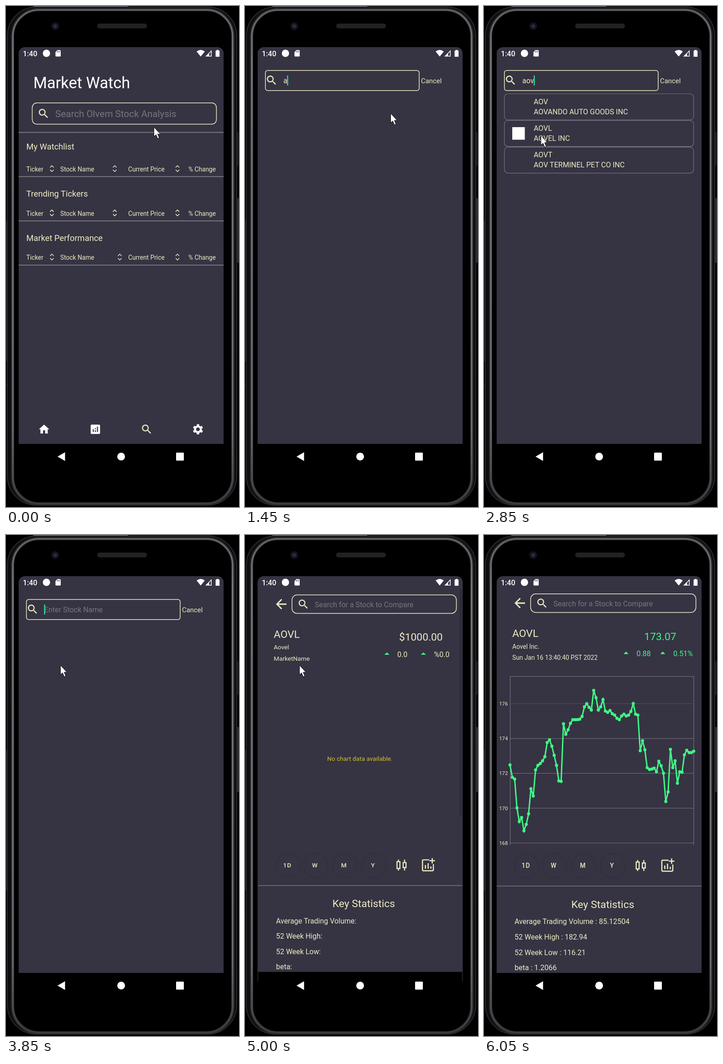
An HTML page that plays this animation: 511 by 1096 pixels, repeating every 6450 ms.

```html
<!DOCTYPE html>
<html lang="en">
<head>
<meta charset="utf-8">
<title>Market Watch</title>
<style>
html, body { margin: 0; width: 100%; height: 100%; overflow: hidden; background: #000; }
svg { display: block; width: 100%; height: 100%; font-family: Roboto, sans-serif; }
text { white-space: pre; }
</style>
</head>
<body>
<svg id="stage" viewBox="0 0 511 1096"></svg>
<script>
const LOOP = 6450, SP = 1.146;
const BG = '#363343', CREAM = '#eeecc2', GREY = '#78767f', GREEN = '#3ffa86';
const CX = 252.5, CY = 552;

// ---- drawing helpers (all return markup) ----
const text = (x, y, sp, str, fill = CREAM, more = '') =>
  `<text x="${x}" y="${y}" font-size="${sp * SP}" fill="${fill}" ${more}>${str}</text>`;
const rect = (x, y, w, h, fill, more = '') =>
  `<rect x="${x}" y="${y}" width="${w}" height="${h}" fill="${fill}" ${more}/>`;
const box = (x, y, w, h, r, stroke, width = 1.5) =>
  rect(x, y, w, h, 'none', `rx="${r}" stroke="${stroke}" stroke-width="${width}"`);
const path = (d, fill, more = '') => `<path d="${d}" fill="${fill}" ${more}/>`;
const line = (d, stroke, width) => path(d, 'none', `stroke="${stroke}" stroke-width="${width}"`);
const circle = (x, y, r, fill, more = '') => `<circle cx="${x}" cy="${y}" r="${r}" fill="${fill}" ${more}/>`;
const icon = (d, x, y, fill = CREAM, s = SP) =>
  path(d, fill, `fill-rule="evenodd" transform="translate(${x} ${y}) scale(${s}) translate(-12 -12)"`);
const group = (id, body) => `<g id="${id}">${body}</g>`;

const LENS = 'M15.5 14h-.8l-.3-.3A6.5 6.5 0 1 0 13.7 14.4l.3.3v.8l5 5 1.5-1.5zM9.5 14a4.5 4.5 0 1 1 0-9 4.5 4.5 0 0 1 0 9z';
const HOME = 'M10 20v-6h4v6h5v-8h3L12 3 2 12h3v8z';
const STATS = 'M5 3h14a2 2 0 0 1 2 2v14a2 2 0 0 1-2 2H5a2 2 0 0 1-2-2V5a2 2 0 0 1 2-2zM7 12h2v5H7zM11 14h2v3h-2zM11 10h2v2h-2zM15 7h2v10h-2z';
const BACK = 'M20 11H7.83l5.59-5.59L12 4l-8 8 8 8 1.41-1.41L7.83 13H20z';

const gear = (x, y) => `<g transform="translate(${x} ${y}) scale(${SP})" fill="none" stroke="#fff">
  <circle r="5.5" stroke-width="4"/>
  <circle r="8.3" stroke-width="3" pathLength="6" stroke-dasharray=".52 .48" stroke-dashoffset="-.24" /></g>`;
const sorter = (x, y) => line(`M${x - 4} ${y - 2.5}l4-4 4 4M${x - 4} ${y + 2.5}l4 4 4-4`, CREAM, 1.5);
const rise = (x, y) => path(`M${x - 5.5} ${y + 2.5}l5.5-5.5 5.5 5.5z`, GREEN);

const screenWindow = (id, body) => group(id,
  rect(27.5, 90, 450, 868, BG) + body + rect(27.5, 958, 450, 57, '#000'));

// ---- screens ----
function market() {
  const table = (title, titleY, y, nameSort) =>
    text(44.5, titleY, 16, title) +
    [['Ticker', 44.5], ['Stock Name', 119], ['Current Price', 268], ['% Change', 400]]
      .map(([s, x]) => text(x, y, 12, s)).join('') +
    [100.5, nameSort, 376].map(x => sorter(x, y - 6)).join('') +
    rect(27.5, y + 10.5, 450, 2, GREY);
  return text(60, 179.5, 30, 'Market Watch', '#fff') +
    box(57.5, 212, 404, 46.5, 10, CREAM) + icon(LENS, 82.3, 235.3) +
    text(108, 243, 18, 'Search Olvem Stock Analysis', GREY) +
    rect(27.5, 275.5, 450, 2, GREY) +
    table('My Watchlist', 313.5, 361.7, 238.5) +
    table('Trending Tickers', 416.5, 458.6, 238.5) +
    table('Market Performance', 513.5, 555.3, 249.5) +
    icon(HOME, 83.5, 926, '#fff') + icon(STATS, 196, 926, '#fff') +
    icon(LENS, 308.5, 926) + gear(421, 926);
}

function search() {
  const rows = [
    ['AOV', 'AOVANDO AUTO GOODS INC'],
    ['AOVL', 'AOVEL INC'],
    ['AOVT', 'AOV TERMINEL PET CO INC']
  ];
  const row = ([ticker, name], i) => {
    const y = 192 + i * 58.3;
    return box(44.7, y, 415, 57, 8, GREY, 1.2) +
      text(109, y + 22.8, 14, ticker) + text(109, y + 44.8, 14, name);
  };
  return box(44.7, 141, 337.3, 44, 5, CREAM) + icon(LENS, 58.3, 162.5) +
    text(386, 168.7, 13, 'Cancel') +
    text(84, 169, 14, 'Enter Stock Name', GREY, 'id="hint"') +
    text(84, 169, 14, '', CREAM, 'id="typed"') +
    rect(0, 152, 2.4, 22, '#2fd890', 'id="caret"') +
    group('results', rows.map(row).join('') + rect(62, 265, 27.5, 27.5, '#fff'));
}

// pixel heights of the price curve, evenly spaced in x
const CURVE = [503, 530, 534, 597, 627, 618, 647, 633, 610, 555, 571, 514, 504, 500, 494, 485, 454, 448, 462, 482,
  504, 538, 539, 413, 436, 426, 412, 404, 404, 404, 403, 397, 376, 369, 377, 383, 340, 356, 383, 376,
  360, 385, 388, 384, 391, 394, 401, 404, 396, 392, 396, 394, 386, 369, 392, 394, 472, 450, 470, 509,
  513, 512, 510, 518, 495, 505, 521, 583, 562, 469, 509, 494, 543, 518, 519, 481, 471, 476, 476, 473];

function chart() {
  const pts = CURVE.map((y, i) => [57 + i * 5.1, y]);
  let out = line('M57.5 678V309.5H460V678', GREY, 1.2);
  for (let i = 0; i < 5; i++) {
    const y = 369 + i * 76.2;
    out += line(`M57 ${y}H460`, i == 0 ? '#55535f' : GREY, 1) +
      text(52.5, y + 4, 10, 176 - 2 * i, CREAM, 'text-anchor="end"');
  }
  return out + line('M' + pts.join('L'), GREEN, 3) +
    pts.map(([x, y]) => circle(x, y, 3.4, GREEN)).join('');
}

function detail() {
  const mid = 'text-anchor="middle"';
  const labels = ['Average Trading Volume', '52 Week High', '52 Week Low', 'beta'];
  const stats = tails => labels.map((s, i) => text(67, 851.3 + i * 33.7, 14, s + tails[i])).join('');
  const buttons = [['1D', 92], ['W', 153], ['M', 217], ['Y', 281]].map(([s, x]) =>
    circle(x + 1.5, 724, 27, 'none', 'stroke="#312e3d" stroke-width="1.5"') +
    text(x, 728, 12, s, CREAM, mid + ' font-weight="500" letter-spacing="1"')).join('');
  return icon(BACK, 78.5, 149, CREAM, 1.44) +
    box(102.3, 128.7, 362.4, 40.8, 11, CREAM) + icon(LENS, 127.3, 149.3) +
    text(152.5, 155.7, 14, 'Search for a Stock to Compare', GREY) +
    text(62, 222.7, 20, 'AOVL') + rise(311.5, 258) + rise(392, 258) +
    group('blank',
      text(62, 248.8, 12, 'Aovel') + text(62, 273, 12, 'MarketName') +
      text(386.5, 229.7, 20, '$1000.00', CREAM, mid) +
      text(334.5, 265, 14, '0.0') + text(415.5, 265, 14, '%0.0') + stats([':', ':', ':', ':'])) +
    group('quote',
      text(62, 248.8, 12, 'Aovel Inc.') + text(62, 273, 12, 'Sun Jan 16 13:40:40 PST 2022') +
      text(386.5, 229.7, 20, '173.07', GREEN, mid) +
      text(334.5, 265, 14, '0.88', GREEN) + text(415, 265, 14, '0.51%', GREEN) +
      stats([' : 85.12504', ' : 182.94', ' : 116.21', ' : 1.2066'])) +
    text(252, 494, 12, 'No chart data available.', '#d3c22f', mid + ' id="noData"') +
    group('chart', chart()) + buttons +
    line('M337 711v4m0 16v4M333.8 715.5h6.4v15h-6.4zM350.5 711v6m0 12v6M347.3 717.5h6.4v11h-6.4z', CREAM, 2.4) +
    line('M405 711.5H392q-2 0-2 2V733q0 2.5 2 2.5H411.5q2.5 0 2.5-2.5V721M396.5 731v-8m6 8v-12m6 12v-5M411.5 707.5v12m-6-6h12', CREAM, 2.5) +
    rect(27.5, 767.2, 450, 1.5, GREY) +
    text(260.5, 815.8, 20, 'Key Statistics', CREAM, mid) +
    rect(472, 116, 5, 498, '#000', 'id="bar" opacity=".15"');
}

// ---- phone body and system bars ----
const body = rect(0, 0, 511, 1096, '#000') + rect(60, 0, 208, 1, '#8a8a8e') +
  rect(504, 276, 6, 74, '#1d1d20', 'rx="2"') + rect(505, 420, 6, 142, '#2c2c2f', 'rx="2"') +
  rect(0, 470, 2, 360, '#1b1b1d') + rect(0, 778, 2, 50, '#000') +
  rect(3, 2, 503, 1090, '#0e0e10', 'rx="64" stroke="#2b2b2e" stroke-width="2"') +
  rect(14.5, 8, 483, 1081, '#000', 'rx="58" stroke="#2c2c30" stroke-width="7"') +
  box(15, 8.5, 482, 1080, 57, 'url(#rim)', 3) +
  circle(108, 44, 8.5, '#14131c') + circle(108, 44, 4, '#2b2a4a') +
  rect(200, 38.5, 109, 10.5, '#222224', 'rx="5"');

const status = text(37, 109.7, 14, '1:40', '#fff', 'font-weight="500"') +
  circle(88.7, 103.5, 8, '#fff') +
  path('M112.5 96.5h6q1.5 0 1.5 1.5v11q0 1.5-1.5 1.5h-8.5q-1.5 0-1.5-1.5v-8z', '#fff') +
  line('M112.5 98.5v3m2.5-3v3m2.5-3v3', BG, 1.2) +
  path('M418 99.5q9-7 18 0l-9 11z', '#fff') +
  path('M451 96.5v14h-14z', '#fff') + path('M449.5 100v9h-4v-5z', BG) +
  path('M462 96h4v1.5h2.3v13.5h-8.6v-13.5h2.3z', '#fff');

const navKeys = path('M113 985.7l16.5-9.5v19z', '#fff') + circle(252.5, 985.7, 8.5, '#fff') +
  rect(373, 977, 17, 17.5, '#fff', 'rx="1.5"');

document.getElementById('stage').innerHTML = `<defs>
  <linearGradient id="rim" x2="0" y2="1"><stop stop-color="#66666c"/><stop offset=".1" stop-color="#808086"/>
  <stop offset=".85" stop-color="#727278"/><stop offset="1" stop-color="#3e3e42"/></linearGradient>
  <clipPath id="glass"><rect x="27.5" y="90" width="450" height="960" rx="14"/></clipPath></defs>` +
  body + '<g clip-path="url(#glass)">' +
  screenWindow('market', market()) + screenWindow('search', search()) + screenWindow('detail', detail()) +
  '</g>' + status + navKeys +
  path('M0 0V20.5L4.6 16.5 8.2 25 11.5 23.5 8 15.2H14Z', '#fff', 'id="cursor" stroke="#111" stroke-width="1"');

const el = {};
for (const node of document.querySelectorAll('[id]')) el[node.id] = node;

// ---- motion ----
const clamp = v => Math.min(1, Math.max(0, v));
const smooth = v => (v = clamp(v), v * v * (3 - 2 * v));
const show = (node, on) => node.setAttribute('display', on ? 'inline' : 'none');
const bezier = ([a, b, c, d], u) => {
  const v = 1 - u;
  return v * v * v * a + 3 * v * v * u * b + 3 * v * u * u * c + u * u * u * d;
};

// quick start, very slow finish: two joined cubic curves
function slowIn(x) {
  const [xs, ys] = x < 1 / 6
    ? [[0, .05, .1333, 1 / 6], [0, 0, .06, .4]]
    : [[1 / 6, .2083, .25, 1], [.4, .82, 1, 1]];
  let lo = 0, hi = 1;
  for (let i = 0; i < 24; i++) {
    const m = (lo + hi) / 2;
    if (bezier(xs, m) < x) lo = m; else hi = m;
  }
  return bezier(ys, lo);
}

const zoom = (node, s) =>
  node.setAttribute('transform', `translate(${CX} ${CY}) scale(${s}) translate(${-CX} ${-CY})`);

function openWindow(from, to, x) {
  x = clamp(x);
  const p = slowIn(x);
  zoom(from, 1 + .05 * p);
  zoom(to, .85 + .15 * p);
  to.setAttribute('opacity', clamp((x - .125) / .125));
  show(to, x > .125);
  show(from, x < 1);
}

function draw(t) {
  const second = (t - 4880) / 220;
  openWindow(el.market, el.search, (t - 400) / 310);
  if (second > 0) openWindow(el.search, el.detail, second);
  else show(el.detail, false);

  const typed = t < 1450 || t >= 3650 ? '' : t < 1600 ? 'a' : t < 1850 ? 'ao' : 'aov';
  el.typed.textContent = typed;
  show(el.hint, !typed);
  show(el.caret, t >= 1450);
  el.caret.setAttribute('x', 83.5 + (typed ? el.typed.getComputedTextLength() : 0));
  show(el.results, t >= 1900 && t < 3650);

  const quoted = t >= 5200, charted = t >= 5350;
  show(el.blank, !quoted);
  show(el.quote, quoted);
  show(el.noData, !charted);
  show(el.chart, charted);
  el.bar.setAttribute('opacity', .15 * clamp((5500 - t) / 250));

  const a = smooth(t / 200), b = smooth((t - 2400) / 500);
  el.cursor.setAttribute('transform', `translate(${324.5 - 5 * a - 200 * b} ${265 - 30 * a + 50 * b})`);
  show(el.cursor, t < 5900);
}

const start = performance.now();
function tick(now) {
  draw(Math.max(0, now - start) % LOOP);
  requestAnimationFrame(tick);
}
draw(0);
requestAnimationFrame(tick);
</script>
</body>
</html>
```
